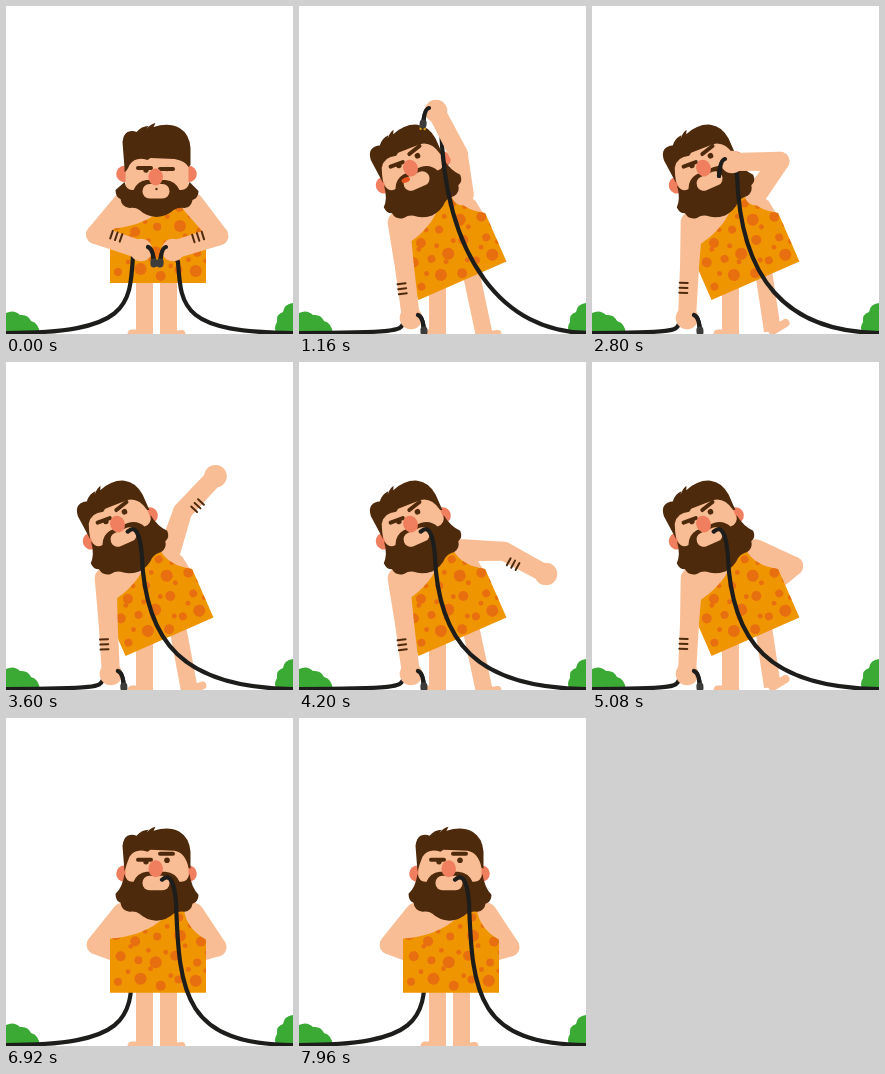
An HTML page with a canvas that plays this animation: 287x328 px, repeating every 8 s.

```html
<!DOCTYPE html>
<html lang="en">
<head>
<meta charset="utf-8">
<title>Caveman and cable</title>
<style>
  html, body { margin: 0; width: 100%; height: 100%; overflow: hidden; background: #fff; }
  canvas { display: block; width: 287px; height: 328px; }
</style>
</head>
<body>
<canvas id="stage"></canvas>
<script>
const W = 287, H = 328, LOOP = 8000, STEP = 40, GROUND = 327;
const SKIN = '#f8bd94', PINK = '#ef7f5f', HAIR = '#4e2a0c', DRESS = '#ef9500',
      SPOT = '#e86f10', GREEN = '#3aaa35', CABLE = '#1d1d1b', PLUG = '#3c3c3b';
const UPPER_ARM = 41, FOREARM = 48;

const canvas = document.getElementById('stage');
const g = canvas.getContext('2d');
const scale = window.devicePixelRatio || 1;
canvas.width = W * scale;
canvas.height = H * scale;

// Motion helpers
const clamp = (v, lo = 0, hi = 1) => Math.max(lo, Math.min(hi, v));
const mix = (a, b, u) => a + (b - a) * u;
const mixPoint = (p, q, u) => [mix(p[0], q[0], u), mix(p[1], q[1], u)];
const add = ([x, y], dx, dy) => [x + dx, y + dy];
const ramp = (t, from, to) => {
  const u = clamp((t - from) / (to - from));
  return u * u * (3 - 2 * u);
};
const travel = (t, start, ...moves) =>
  moves.reduce((p, [from, to, x, y]) => mixPoint(p, [x, y], ramp(t, from, to)), start);

// Two-bone arm; the sign of bend picks the elbow's side
function elbow(shoulder, hand, bend) {
  const dx = hand[0] - shoulder[0], dy = hand[1] - shoulder[1];
  const d = Math.hypot(dx, dy) || 1;
  const stretch = Math.max(1, d / (UPPER_ARM + FOREARM));
  const a = UPPER_ARM * stretch, b = FOREARM * stretch;
  const along = (a * a - b * b + d * d) / (2 * d);
  const out = bend * Math.sqrt(Math.max(0, a * a - along * along));
  return add(shoulder, (dx * along + dy * out) / d, (dy * along - dx * out) / d);
}

function pose(t) {
  const raise = ramp(t, 80, 640);
  const lean = raise - ramp(t, 5860, 6480);
  const tug = ramp(t, 1400, 2000) - ramp(t, 3400, 3760) + ramp(t, 4360, 4900);
  const bite = ramp(t, 3400, 3600);
  const angle = -23.7 * lean * Math.PI / 180;
  const base = [152 + 11.5 * lean,
    277 - 2.3 * raise + 4.5 * Math.sin(Math.PI * clamp((t - 5840) / 400))];
  const place = (x, y) => add(base,
    x * Math.cos(angle) - y * Math.sin(angle),
    x * Math.sin(angle) + y * Math.cos(angle));

  const rightHand = travel(t, [167, 244],
    [80, 640, 137, 105], [1280, 1840, 140, 156],
    [3400, 3640, 215, 111], [3640, 4080, 247, 212],
    [4360, 4880, 165, 235], [6040, 6480, 165, 243]);
  const leftHand = mixPoint([135, 244], [112 - 17 * tug, 312],
    raise - ramp(t, 6040, 6480));
  const rightShoulder = place(35, -79), leftShoulder = place(-35, -79);

  const held = grip(rightHand, -1, 5, 12);
  const mouth = place(4, -113);
  const bitten = [mouth, add(mouth, 9, 0.5), add(mouth, 14, 22)];
  const bend = 1 - 2 * (raise - bite);

  return {
    t, lean, tug, angle, base, look: 1 - raise,
    right: { shoulder: rightShoulder, hand: rightHand, elbow: elbow(rightShoulder, rightHand, bend) },
    left: { shoulder: leftShoulder, hand: leftHand, elbow: elbow(leftShoulder, leftHand, -1) },
    rightCable: held.map((p, i) => mixPoint(p, bitten[i], bite)),
    leftCable: grip(leftHand, 1, -8, 6)
  };
}

// Cable inside a fist: tip, top of the loop, exit
function grip(hand, side, outX, outY) {
  return [add(hand, 13 * side, 14), add(hand, 7 * side, -3), add(hand, outX, outY)];
}

// Drawing helpers
function fillPath(d, color) {
  g.fillStyle = color;
  g.fill(new Path2D(d));
}

function oval(x, y, rx, ry, color) {
  g.fillStyle = color;
  g.beginPath();
  g.ellipse(x, y, rx, ry, 0, 0, 7);
  g.fill();
}

function line(x1, y1, x2, y2, width, color, cap = 'round') {
  g.strokeStyle = color;
  g.lineWidth = width;
  g.lineCap = cap;
  g.beginPath();
  g.moveTo(x1, y1);
  g.lineTo(x2, y2);
  g.stroke();
}

function limb([x1, y1], r1, [x2, y2], r2) {
  const a = Math.atan2(y2 - y1, x2 - x1), d = Math.hypot(x2 - x1, y2 - y1) || 1;
  const k = Math.acos(clamp((r1 - r2) / d, -1, 1));
  g.fillStyle = SKIN;
  g.beginPath();
  g.arc(x1, y1, r1, a + k, a - k + 2 * Math.PI);
  g.arc(x2, y2, r2, a - k, a + k);
  g.fill();
}

function strokeCable(trace) {
  g.strokeStyle = CABLE;
  g.lineWidth = 4.2;
  g.lineCap = 'round';
  g.beginPath();
  trace();
  g.stroke();
}

// Control point that makes the loop pass through its top
const loopControl = ([tip, top, out]) =>
  [2 * top[0] - (tip[0] + out[0]) / 2, 2 * top[1] - (tip[1] + out[1]) / 2];

function cable(points, endX, slack) {
  const [x, y] = points[2], drop = GROUND - y;
  strokeCable(() => {
    g.moveTo(...points[0]);
    g.quadraticCurveTo(...loopControl(points), x, y);
    g.bezierCurveTo(x + 3 * Math.sign(endX - x), y + drop * 0.65,
      x + drop * slack, GROUND, endX, GROUND);
  });
}

function cableTip(points, plug, prongs) {
  const [tip, top] = points, control = mixPoint(tip, loopControl(points), 0.5);
  const d = Math.hypot(control[0] - tip[0], control[1] - tip[1]) || 1;
  const ux = (control[0] - tip[0]) / d, uy = (control[1] - tip[1]) / d;
  strokeCable(() => {
    g.moveTo(...tip);
    g.quadraticCurveTo(...control, ...top);
  });
  if (prongs) {
    for (const s of [-2, 2]) {
      const [x, y] = add(tip, -uy * s, ux * s);
      line(x, y, x - ux * 5, y - uy * 5, 2, '#e5a814', 'butt');
    }
  }
  if (plug) line(...tip, ...add(tip, ux * 2, uy * 2), 7, PLUG);
}

function bands(from, to, at, offset) {
  const d = Math.hypot(to[0] - from[0], to[1] - from[1]) || 1;
  const ux = (to[0] - from[0]) / d, uy = (to[1] - from[1]) / d;
  const middle = mixPoint(from, to, at);
  for (const k of [-5, 0, 5]) {
    const [x, y] = add(middle, ux * k - uy * offset, uy * k + ux * offset);
    line(x - uy * 4, y + ux * 4, x + uy * 4, y - ux * 4, 2, HAIR);
  }
}

const upperArm = arm => limb(arm.shoulder, 11, arm.elbow, 9.5);

function forearm(arm) {
  limb(arm.elbow, 9.5, arm.hand, 9);
  oval(...arm.hand, 11.3, 11.3, SKIN);
}

// Scene parts
function bushes() {
  fillPath('M0 307Q8 303 14 309Q22 308 25 315Q33 317 34 328H0Z', GREEN);
  fillPath('M287 297Q278 298 277 306Q270 308 271 316Q267 322 271 328H287Z', GREEN);
  oval(27, 328, 4, 2.5, '#fff');
}

function legs(lean, tug) {
  const hip = 162.5 + 8.5 * lean;
  const ankle = [162.5 + (23 - 5 * tug) * lean, 330 - 5 * tug * lean];
  line(138.5, 262, 138.5, 330, 17, SKIN, 'butt');
  line(138, 328, 126, 328, 9, SKIN);
  line(hip, 262, ...ankle, 17, SKIN, 'butt');
  line(...ankle, ankle[0] + 13, 328 - 11 * tug * lean, 8, SKIN);
}

function torso() {
  fillPath('M-47 -45L-44 -66L-30 -90H30L44 -68L47 -45Z', SKIN);
  const dress = new Path2D('M-48 0V-54C-22 -56 2 -66 13 -84H26C27 -70 36 -60 48 -53V0Z');
  g.fillStyle = DRESS;
  g.fill(dress);
  g.save();
  g.clip(dress);
  for (let row = 0; row < 4; row++) {
    for (let col = 0; col < 5; col++) {
      const x = -40 + col * 20 + 3 * Math.sin(row * 2 + col);
      const y = -11 - row * 22 - 4 * Math.sin(col * 2.3 + row);
      const r = 4 + (col * 2 + row) % 3;
      oval(x, y, r, r, SPOT);
      oval(x + 10, y - 10, 2.4, 2.4, SPOT);
    }
  }
  g.restore();
}

function brow(x, y, a) {
  const dx = 6.5 * Math.cos(a), dy = 6.5 * Math.sin(a);
  line(x - dx, y - dy, x + dx, y + dy, 4, HAIR);
}

function head({ look, lean, t }) {
  const f = look * 12, ear = look * 4, tilt = -0.26 * lean;
  g.save();
  g.translate(-1.5, -119 + look * 6);
  for (const side of [-1, 1]) oval(32 * side, ear, 8.3, 8.3, PINK);
  fillPath('M-31 -25Q-31 -38 0 -38Q32 -38 32 -25V24Q20 36 0 36Q-20 36 -31 24Z', SKIN);

  fillPath(`M-32 -2L-34 -28Q-33 -36 -29 -38Q-24 -40 -20 -38Q-15 -44 -8 -44L-10 -41
    Q-6 -46 -1 -47L-3 -43Q12 -48 23 -42Q33 -36 34 -22V-5L32 ${-6 + look * 3}
    Q29 ${-21 + f} 18 ${-23 + f}L-6 ${-24 + f}L-9 ${-22 + f}Q-21 ${-26 + f} -27 ${-17 + f}
    Q-30 ${-10 + f} -32 ${-2 + ear}Z`, HAIR);

  fillPath(`M-32 ${f}Q-34 14 -41 20Q-41 27 -36 29Q-35 37 -27 38Q-21 37 -17 40
    Q-11 46 0 47Q11 46 17 40Q22 37 28 38Q35 37 36 30Q42 28 42 21Q35 14 33 ${f}
    Q31 ${9 + f} 23 ${8 + f}Q19 ${-1 + f} 9 ${-2 + f}H-10Q-19 ${-1 + f} -23 ${8 + f}
    Q-30 ${9 + f} -32 ${f}Z`, HAIR);
  g.fillStyle = SKIN;
  g.beginPath();
  g.roundRect(-14, 2 + f, 27, 14.5, 7);
  g.fill();
  if (look > 0.3) oval(0, 7 + f, 1.2, 1.2, HAIR);
  if (look < 0.3 && t < 1640) oval(-10, 4, 4.5, 2.5, '#e8541e');

  oval(-10.5, -12 + f, 2.7, 2.7, HAIR);
  oval(10.5, -13.5 + f, 2.8, 2.8, HAIR);
  if (look > 0.3) line(-17, -15 + f, 18, -15 + f, 3, SKIN, 'butt');
  brow(-12, -14 + f, -tilt / 4);
  brow(10, mix(-20, -13, look) + f, tilt);
  oval(-0.8, -5 + f, 7.3, 8.5, PINK);
  g.restore();
}

function inBody(p, part) {
  g.save();
  g.translate(...p.base);
  g.rotate(p.angle);
  part(p);
  g.restore();
}

function draw(t) {
  g.setTransform(scale, 0, 0, scale, 0, 0);
  g.fillStyle = '#fff';
  g.fillRect(0, 0, W, H);

  const p = pose(t), { left, right } = p;
  const rightBack = t >= 3560, leftBack = t >= 6280;
  const leftCable = () => cable(p.leftCable, 0, -0.05);

  bushes();
  legs(p.lean, p.tug);
  if (leftBack) {
    leftCable();
    upperArm(left);
    forearm(left);
  }
  if (rightBack) {
    upperArm(right);
    forearm(right);
    if (t < 4640) bands(right.elbow, right.hand, 0.3, 7);
  }
  inBody(p, torso);
  if (!rightBack) upperArm(right);
  if (!leftBack) upperArm(left);
  inBody(p, head);
  cable(p.rightCable, 290, 0.06 + 0.24 * p.lean);
  if (!leftBack) {
    leftCable();
    forearm(left);
    bands(left.elbow, left.hand, 0.42, mix(5, -5, p.look));
    cableTip(p.leftCable, true, false);
  }
  if (!rightBack) {
    forearm(right);
    if (t < 360) bands(right.elbow, right.hand, 0.42, 5);
    cableTip(p.rightCable, t < 1640, t > 360 && t < 1640);
  }
}

function tick() {
  const t = performance.now() % LOOP;
  draw(Math.floor(t / STEP) * STEP);
  requestAnimationFrame(tick);
}
tick();
</script>
</body>
</html>
```
